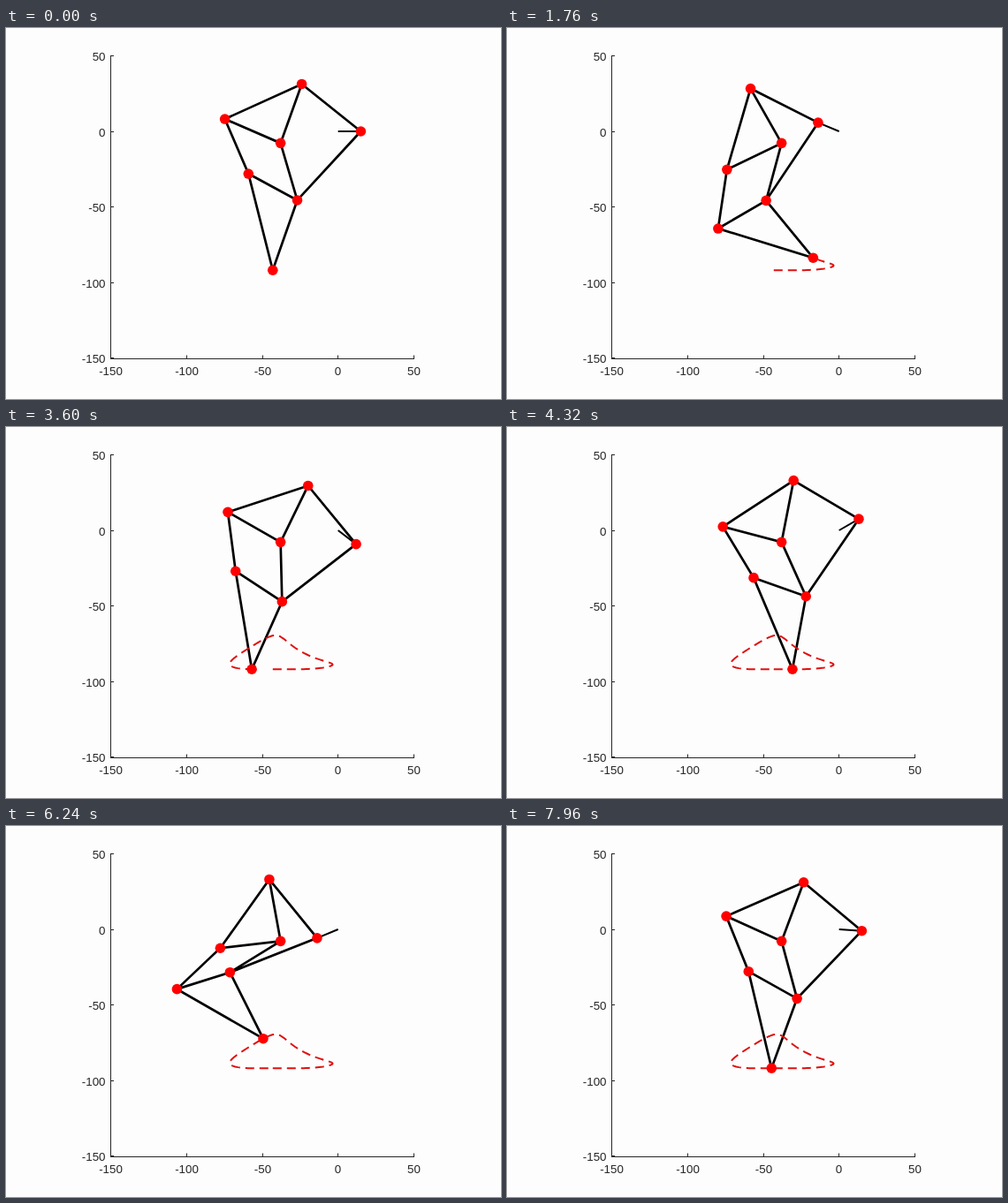
Write an HTML page that moves like this. It is 560 by 420 pixels and loops after 8000 ms.

```html
<!DOCTYPE html>
<html lang="en">
<head>
<meta charset="utf-8">
<title>Walking linkage</title>
<style>
  html, body { margin: 0; width: 100%; height: 100%; overflow: hidden; background: #fdfdfd; }
  svg { display: block; width: 560px; height: 420px; }
  text { font: 13.33px "Liberation Sans", Arial, sans-serif; fill: #262626; }
  path { fill: none; stroke: #000; }
  #axes { stroke: #262626; }
  #trace { stroke: #e01010; stroke-width: 2; stroke-dasharray: 10 6; stroke-linejoin: round; }
  #crank { stroke-width: 2; }
  #bars { stroke-width: 2.7; }
  circle { fill: #f00; }
</style>
</head>
<body>
<svg viewBox="0 0 560 420">
  <path id="axes"/>
  <g id="labels"></g>
  <path id="bars"/>
  <path id="crank"/>
  <path id="trace"/>
  <g id="joints"></g>
</svg>
<script>
const LOOP = 8000, TICK = 40;
const STEPS_PER_TURN = 96;
const SCALE = 1.7125, ORIGIN = [375.7, 117];
const PIVOT = [-38, -7.8];

const $ = id => document.getElementById(id);
const toStage = ([x, y]) => [ORIGIN[0] + x * SCALE, ORIGIN[1] - y * SCALE];
const polyline = points =>
  'M' + points.map(p => toStage(p).map(v => v.toFixed(2)).join(' ')).join('L');

function addShape(parent, tag, attrs, content = '') {
  const el = document.createElementNS('http://www.w3.org/2000/svg', tag);
  for (const name in attrs) el.setAttribute(name, attrs[name]);
  el.textContent = content;
  return parent.appendChild(el);
}

// Point at distance ra from a and rb from b, on the left of a -> b.
function meet(a, ra, b, rb) {
  const dx = b[0] - a[0], dy = b[1] - a[1], d = Math.hypot(dx, dy);
  const along = (ra * ra - rb * rb + d * d) / (2 * d);
  const off = Math.sqrt(ra * ra - along * along);
  return [a[0] + (along * dx - off * dy) / d, a[1] + (along * dy + off * dx) / d];
}

function solve(step) {
  const angle = step / STEPS_PER_TURN * 2 * Math.PI;
  const crank = [15 * Math.cos(angle), 15 * Math.sin(angle)];
  const top = meet(PIVOT, 41.5, crank, 50);
  const left = meet(PIVOT, 40.1, top, 55.8);
  const knee = meet(crank, 61.9, PIVOT, 39.3);
  const hip = meet(knee, 36.7, left, 39.4);
  const foot = meet(knee, 49, hip, 65.7);
  return { crank, top, left, knee, hip, foot };
}

function drawAxes() {
  let d = 'M118.5 31V374.5M118 374.5H462';
  for (let v = -150; v <= 50; v += 50) {
    const x = Math.floor(toStage([v, 0])[0]) + 0.5;
    const y = Math.floor(toStage([0, v])[1]) + 0.5;
    d += `M${x} 374v-3.5M118.5 ${y}h3.5`;
    addShape($('labels'), 'text', { x, y: 393, 'text-anchor': 'middle' }, v);
    addShape($('labels'), 'text', { x: 112.5, y: y + 5, 'text-anchor': 'end' }, v);
  }
  $('axes').setAttribute('d', d);
}

drawAxes();
const dots = Array.from({ length: 7 }, () => addShape($('joints'), 'circle', { r: 5.8 }));
const footPath = Array.from({ length: STEPS_PER_TURN + 1 }, (_, i) => solve(i).foot);

function draw(time) {
  // 24 poses per second on a 25 Hz clock: one pose in each second is held.
  const tick = Math.floor(time % LOOP / TICK);
  const step = tick - Math.floor((tick + 13) / 25);
  const { crank, top, left, knee, hip, foot } = solve(step);

  $('crank').setAttribute('d', polyline([[0, 0], crank]));
  $('bars').setAttribute('d', [
    [crank, top, left, hip, foot, knee, crank],
    [top, PIVOT, left],
    [PIVOT, knee, hip]
  ].map(polyline).join(''));
  $('trace').setAttribute('d', polyline(footPath.slice(0, step + 1)));

  [PIVOT, crank, top, left, knee, hip, foot].forEach((p, i) => {
    const [x, y] = toStage(p);
    dots[i].setAttribute('cx', x);
    dots[i].setAttribute('cy', y);
  });
}

const start = performance.now();
function frame() {
  draw(performance.now() - start);
  requestAnimationFrame(frame);
}
frame();
</script>
</body>
</html>
```
